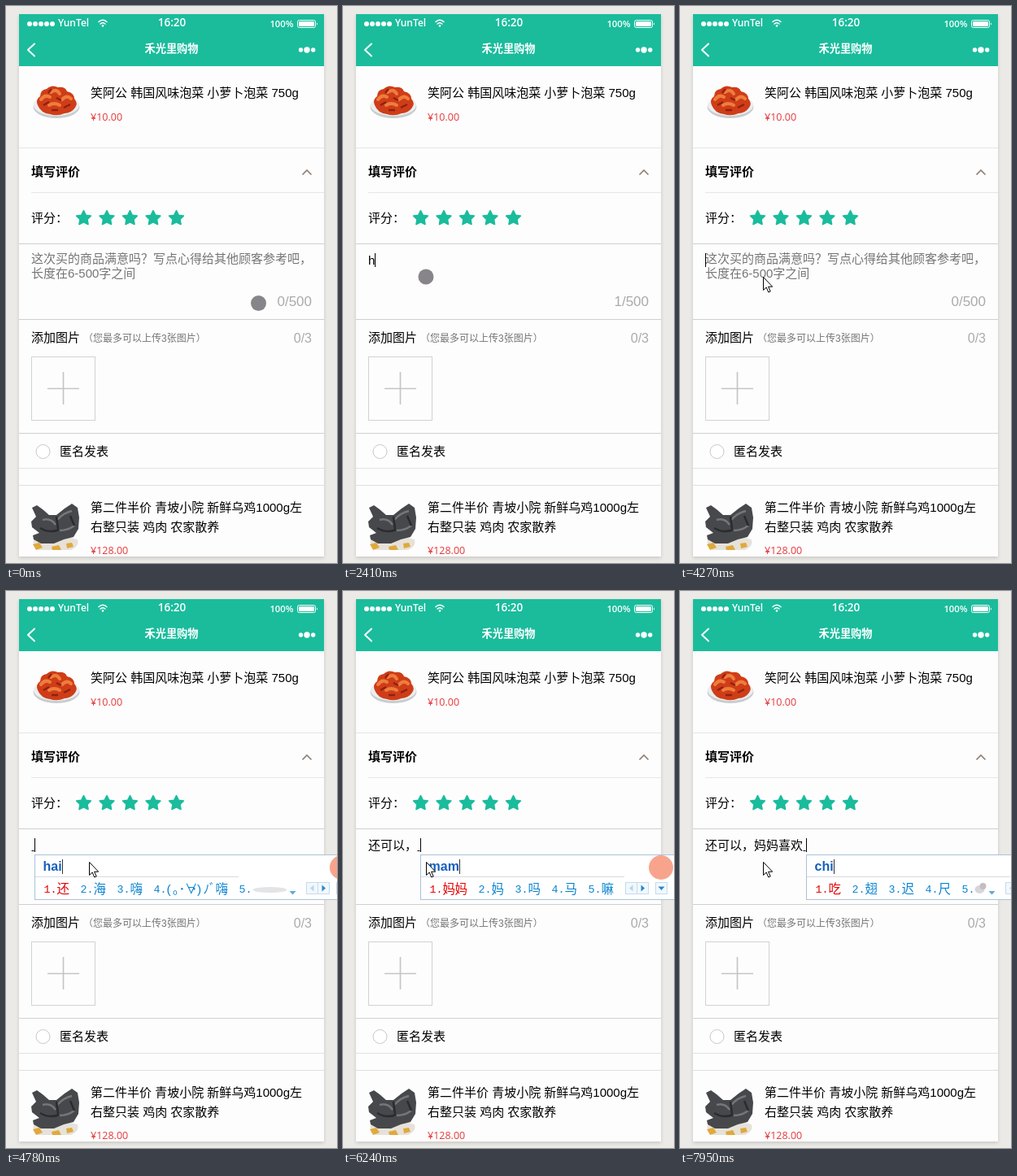
Recreate the animation shown at these times as an HTML page. Size 407 by 685 pixels, loop 8000 ms.

```html
<!DOCTYPE html>
<html lang="zh-CN">
<head>
<meta charset="utf-8">
<title>填写评价</title>
<style>
  html, body { margin: 0; width: 100%; height: 100%; overflow: hidden; background: #ebeae6; }
  svg { display: block; }
  text { font: 15px "Liberation Sans", "Noto Sans CJK SC", sans-serif; fill: #000; white-space: pre; }
  .mid { font-family: "Noto Sans CJK TC", sans-serif; }
  .status { font: 600 12px "Open Sans", sans-serif; fill: #fff; }
  .title { font-size: 13.2px; font-weight: 700; fill: #fff; }
  .price { font: 12.5px "Open Sans", sans-serif; fill: #e4393c; }
  .bold { font-weight: 700; }
  .hint { fill: #757575; }
  .small { font-size: 12px; fill: #757575; }
  .count { font-size: 16px; fill: #aaa; text-anchor: end; }
  .big { font-size: 17px; }
  .comp { font-size: 16px; font-weight: 700; fill: #1560bd; }
  .cand { font-size: 15.5px; font-weight: 300; fill: #0a84d0; }
  .num { font: 13.33px "Liberation Mono", monospace; fill: #0a84d0; }
  .first { fill: #e60000; }
  .line { fill: none; stroke: #fff; stroke-width: 2; stroke-linecap: round; stroke-linejoin: round; }
  #phone { filter: drop-shadow(0 2px 2px rgba(0, 0, 0, .14)); }
</style>
</head>
<body>
<svg width="407" height="685" viewBox="0 0 407 685">
  <clipPath id="screen"><rect x="16" y="10" width="375" height="667"/></clipPath>
  <rect id="phone" x="16" y="10" width="375" height="667" fill="#fdfdfd"/>
  <g clip-path="url(#screen)">
    <rect x="16" y="10" width="375" height="64" fill="#1abc9c"/>
    <g id="signal" fill="#fff"></g>
    <text class="status" x="64" y="25">YunTel</text>
    <g class="line" style="stroke-width:1.5">
      <path d="M114 19.5q5-4.4 10 0M116 22q3-2.4 6 0"/>
      <circle cx="119" cy="24.3" r=".6"/>
    </g>
    <text class="status" x="204" y="25" text-anchor="middle" style="font-size:13.5px">16:20</text>
    <text class="status" x="353.5" y="26" text-anchor="end" style="font-size:11.3px">100%</text>
    <rect x="358.5" y="17.5" width="22" height="9" rx="2" fill="none" stroke="#fff"/>
    <rect x="360" y="19" width="19" height="6" rx="1" fill="#fff"/>
    <path d="M382 20.5q2 1.5 0 3z" fill="#fff"/>
    <path class="line" d="M35 46.5l-8 7.5 8 7.5"/>
    <text class="title" x="203.5" y="57" text-anchor="middle">禾光里购物</text>
    <g fill="#fff"><circle cx="362.5" cy="54" r="2.7"/><circle cx="370" cy="54" r="3.7"/><circle cx="377.7" cy="54" r="2.7"/></g>

    <g>
      <ellipse cx="62" cy="124" rx="28.5" ry="14" fill="#c9cdd0"/>
      <ellipse cx="62" cy="122" rx="28" ry="13" fill="#eceeef"/>
      <path d="M39 122q-3-7 3-11 0-8 8-9 6-6 14-2 9-1 11 5 9 2 9 9 5 6 1 11-5 7-13 7-9 4-18 1-11-1-15-11z" fill="#cf3d18"/>
      <path d="M43 115q5-7 11-3M55 106q7-5 11 2M69 115q6-6 11-1M53 122q6-4 13 0" fill="none" stroke="#ee7d3c" stroke-width="4" stroke-linecap="round"/>
      <path d="M46 122l7-4M62 113l6 3M71 125l8-4M56 102l-4 5M56 128l8 0" stroke="#8f2011" stroke-width="2.5"/>
    </g>
    <text x="104" y="112">笑阿公 韩国风味泡菜 小萝卜泡菜 750g</text>
    <text class="price" x="104" y="141">¥10.00</text>

    <text class="bold" x="31" y="209">填写评价</text>
    <path d="M364.5 207.5l5.5-5.5 5.5 5.5" fill="none" stroke="#8c7f76" stroke-width="1.6"/>
    <text x="31" y="266">评分<tspan class="mid">：</tspan></text>
    <g id="stars" fill="#1abc9c" stroke="#1abc9c" stroke-width="1.8" stroke-linejoin="round"></g>
    <text x="31" y="413">添加图片</text>
    <text class="small" x="95" y="412.5">（您最多可以上传3张图片）</text>
    <text class="count" x="376" y="414">0/3</text>
    <rect x="31.5" y="431.5" width="78" height="78" fill="none" stroke="#d2d2d2"/>
    <path d="M51 470.5h39M70.5 450v40" stroke="#c4c4c4" stroke-width="1.6"/>
    <circle cx="45.5" cy="548" r="8.5" fill="#fff" stroke="#c8c8c8"/>
    <text x="66" y="553">匿名发表</text>
    <g id="rules"></g>

    <g>
      <path d="M34 656q26-8 54 0 3 8-8 13h-40q-8-4-6-13z" fill="#e6e2da"/>
      <path d="M33 662l8-2 4 6-8 3zM56 665l9-2 3 6h-11zM74 661l7-1 2 5-8 2z" fill="#e0a93c"/>
      <path d="M32 617l6-3 7 5 8 7 9 0 10-8 9-6 7 5 2 12-1 14-6 10-12 3-12 5-16 0-9-5-1-5 8-3-9-7-1-7 6-6z" fill="#47484c"/>
      <path d="M45 632q10-3 16 6M63 632q8-9 18-11M66 645q10 0 18-6" fill="none" stroke="#74767b" stroke-width="2.5"/>
      <path d="M42 642q12 7 23 2M62 628l2 15M79 627l5 12" fill="none" stroke="#2b2b2f" stroke-width="2.5"/>
    </g>
    <text x="104" y="622">第二件半价 青坡小院 新鲜乌鸡1000g左</text>
    <text x="104" y="646">右整只装 鸡肉 农家散养</text>
    <text class="price" x="104" y="674">¥128.00</text>

    <g id="hint">
      <text class="hint" x="31" y="316">这次买的商品满意吗<tspan class="mid">？</tspan>写点心得给其他顾客参考吧<tspan class="mid">，</tspan></text>
      <text class="hint" x="31" y="334">长度在6-500字之间</text>
    </g>
    <text id="typed" x="31" y="318"></text>
    <text id="count" class="count big" x="376" y="369"></text>
    <path id="dot" d="M0 319.5h3" stroke="#000"/>
    <rect id="caret" y="304" width="1" height="17"/>
  </g>
  <g id="ime"></g>
  <circle id="touch" r="9.5" fill="#3b363d" fill-opacity=".6"/>
  <path id="arrow" d="M102.5 333.5v16l3.7-3.5 2.6 6 2.4-1-2.6-5.8h5.1z" fill="#fff" stroke="#000"/>
</svg>
<script>
const LOOP = 8000;
const $ = id => document.getElementById(id);
const H = '好 和 会 还 很';

// [time, committed text, composition, candidates]
const steps = [
  [0, ''], [1230, ''], [1730, ''], [2290, ''],
  [2410, 'h'], [2540, 'ha'], [2660, 'hai'], [2930, 'ha'], [3080, 'h'], [3200, ''],
  [3700, '', 'h', '好 ◌ 还 和 哈哈哈哈哈'], [3820, '', 'ha', '好 ◌ 还 和 哈哈哈哈哈'],
  [3970, '', 'ha', '好 ◍ 还 和 哈哈哈哈哈'], [4120, '', 'ha', '好 ◌ 还 和 哈哈哈哈哈'],
  [4270, ''],
  [4540, '', 'h', H], [4660, '', 'ha', '哈 蛤 哈哈 铪 ☁'],
  [4780, '', 'hai', '还 海 嗨 (｡･∀･)ﾉﾞ嗨 ☁'],
  [4900, '还'], [5150, '还', ' '], [5270, '还', 'k', '看 可 快 开 ☁'],
  [5420, '还', 'ky', '可以 考研 抗议 开业 空'], [5570, '还可以'],
  [5850, '还可以，'], [6000, '还可以，', 'm', '吗 没 买 嘛 们'],
  [6120, '还可以，', 'ma', '吗 妈 马 嘛 码'], [6240, '还可以，', 'mam', '妈妈 妈 吗 马 嘛'],
  [6490, '还可以，妈妈'], [6610, '还可以，妈妈', ' '],
  [6730, '还可以，妈妈', 'x', '想 下 小 新 ☺'],
  [6880, '还可以，妈妈', 'xi', '洗 吸 系 溪 χ'],
  [7160, '还可以，妈妈', 'xih', '喜欢 西湖 洗 吸 系'],
  [7280, '还可以，妈妈', 'xihu', '喜欢 西湖 洗 吸 系'],
  [7430, '还可以，妈妈喜欢'],
  [7710, '还可以，妈妈喜欢', 'c', '才 从 吃 出 ☺'],
  [7830, '还可以，妈妈喜欢', 'ch', '吃 出 车 长 ☺'],
  [7950, '还可以，妈妈喜欢', 'chi', '吃 翅 迟 尺 ☺']
];
const touches = [
  [0, 310.5, 365.5], [150, 262, 342], [270, 166.5, 300], [390, 168.5, 298.5],
  [540, 172.5, 280.5], [690, 176.5, 274.5], [840, 138, 302],
  [960, 100.5, 335.5], [1080, 102, 333]
];

const at = (list, t) => list.findLast(s => s[0] <= t);
const show = (id, on) => $(id).setAttribute('visibility', on ? 'visible' : 'hidden');
const text = (cls, x, y, s) => `<text class="${cls}" x="${x}" y="${y}">${s}</text>`;
const box = (x, y, w, h, fill, stroke) =>
  `<rect x="${x}" y="${y}" width="${w}" height="${h}" fill="${fill}" stroke="${stroke}"/>`;
const tri = (x, y, dir, fill) =>
  `<path d="M-4-2h8l-4 4.5z" fill="${fill}" transform="translate(${x} ${y}) rotate(${dir})"/>`;
const disc = (x, y, rx, ry, fill) => `<ellipse cx="${x}" cy="${y}" rx="${rx}" ry="${ry}" fill="${fill}"/>`;
const charWidth = c => /[()∀｡-ﾟ]/.test(c) ? 7.5 : 15;

function glyphs(word, x) {
  switch (word) {
    case '☁': return [disc(x + 22, 367.5, 21, 3.5, '#e2e4e6'), 44];
    case '☺': return [disc(x + 6, 367, 6, 5, '#d8d6d8') + disc(x + 10, 363, 4, 4, '#c3bec2'), 15];
    case '◌': return [disc(x + 8, 366, 5, 7, '#dfe2e5'), 15];
    case '◍': return [disc(x + 9, 366, 4, 6, '#c9ced3'), 15];
  }
  const xs = [];
  let w = 0;
  for (const c of word) { xs.push(x + w); w += charWidth(c); }
  return [text('cand', xs.join(' '), 371.5, word), w];
}

function imeMarkup(left, comp, cands) {
  let x = left + 11.5, end = x, items = '';
  cands.split(' ').forEach((word, i) => {
    const [body, w] = glyphs(word, x + 16);
    const entry = text('num', x, 371, `${i + 1}.`) + body;
    items += i ? entry : entry.replace(/class="(\w+)"/g, 'class="$1 first"');
    end = x + 16 + w;
    x = end + 14;
  });
  const more = /[☁☺]$/.test(cands);
  const nav = Math.round(end + (more ? 22 : 14));
  const button = (bx, dir, fill) =>
    box(bx + .5, 358.5, 14, 14, '#f1f8fd', '#c4dcee') + tri(bx + 7.5, 365.5, dir, fill);
  return box(left + .5, 324.5, nav + 62 - left, 55, '#fff', '#a9c3da') +
    `<path d="M${left + 1} 351.5h250" stroke="#d5dce3"/>` +
    text('comp', left + 10.5, 344, comp) +
    '<rect id="mark" y="330" width="1" height="18" fill="#333"/>' + items +
    (more ? tri(end + 6, 371, 0, '#5da9dc') : '') +
    button(nav, 90, '#b9d6ea') + button(nav + 14, -90, '#2b86c9') + button(nav + 37, 0, '#2b86c9') +
    disc(nav + 44, 340, 15, 15, '#f8a48c');
}

function apply([time, value, comp, cands]) {
  const end = 31 + [...value].reduce((w, c) => w + (c === 'i' ? 3.33 : c < '~' ? 8.34 : 15), 0);
  const left = Math.round(end) + (comp ? 4 : 0);
  $('typed').innerHTML = value.replace('，', '<tspan class="mid">，</tspan>');
  $('count').textContent = `${value.length}/500`;
  show('hint', !value && !comp);
  show('dot', comp);
  $('dot').setAttribute('transform', `translate(${end + .5})`);
  $('caret').setAttribute('x', left);
  show('caret', time === 1230 || time >= 2290);
  $('ime').innerHTML = cands ? imeMarkup(left, comp, cands) : '';
  if (cands) {
    const width = $('ime').querySelector('.comp').getComputedTextLength();
    $('mark').setAttribute('x', Math.round(left + 10.5 + width));
  }
}

function drawStatic() {
  for (let i = 0; i < 5; i++) {
    $('signal').innerHTML += disc(29 + i * 7, 22, 3, 3, '#fff');
    const points = Array.from({ length: 10 }, (_, k) => {
      const r = k % 2 ? 4.6 : 9.2, a = k * Math.PI / 5;
      return `${95.5 + i * 28.5 + r * Math.sin(a)},${261 - r * Math.cos(a)}`;
    });
    $('stars').innerHTML += `<polygon points="${points.join(' ')}"/>`;
  }
  const rules = [[174, 16, '#e6e6e6'], [229, 31, '#e6e6e6'], [292, 16, '#cfcfcf'], [385, 16, '#cfcfcf'],
    [525, 16, '#d2d2d2'], [568, 16, '#e2e2e2'], [589, 16, '#dedede']];
  $('rules').innerHTML = rules.map(([y, x, c]) =>
    `<rect x="${x}" y="${y}" width="${391 - x}" height="1" fill="${c}"/>`).join('');
}

let current;
function frame() {
  const t = (performance.now() - start) % LOOP;
  const step = at(steps, t);
  if (step !== current) apply(current = step);
  const [, x, y] = at(touches, t);
  $('touch').setAttribute('cx', x);
  $('touch').setAttribute('cy', y);
  show('touch', t < 3700);
  show('arrow', t >= 3700);
  requestAnimationFrame(frame);
}

drawStatic();
const start = performance.now();
frame();
</script>
</body>
</html>
```
